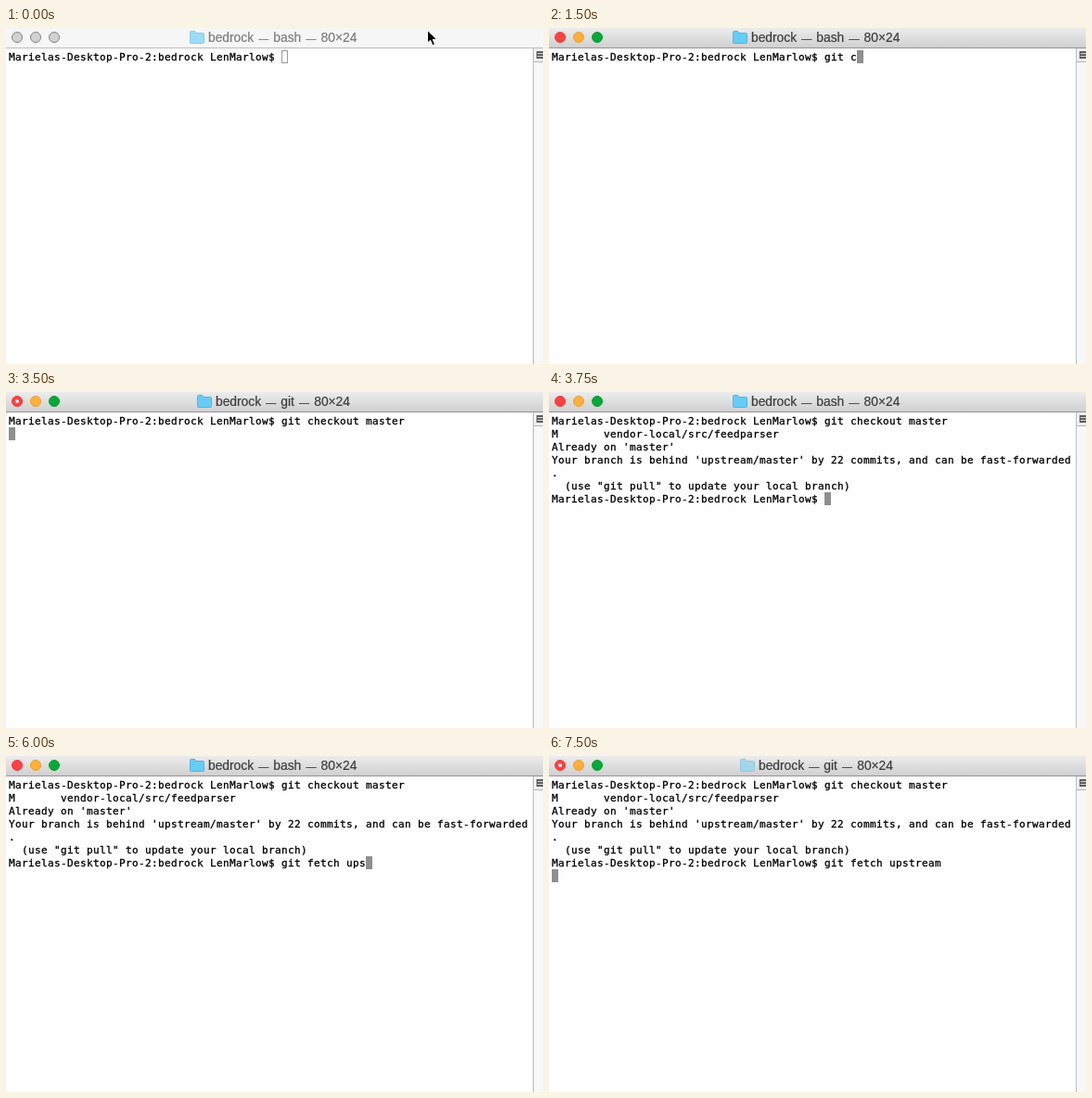
Recreate the animation shown at these times as an HTML page. Size 579 by 362 pixels, loop 8000 ms.

```html
<!DOCTYPE html>
<html lang="en">
<head>
<meta charset="utf-8">
<title>Terminal</title>
<style>
  html, body { margin: 0; width: 579px; height: 362px; overflow: hidden; background: #fefefe; }
  body { position: relative; }
  svg { position: absolute; overflow: visible; }

  #bar {
    position: absolute; left: 0; top: 0; width: 579px; height: 21px;
    background: linear-gradient(#ececec, #d0d0d0);
    border-bottom: 1px solid #949494;
  }
  #title {
    position: absolute; left: 198px; top: 0; padding-left: 20px;
    font: 13.8px/21px "Liberation Sans", Arial, sans-serif;
    word-spacing: 1.3px;
    -webkit-text-stroke: .2px;
    color: #3c3c3c; white-space: pre;
  }
  #title i { font-size: 11px; font-style: normal; }
  #title svg { left: 0; top: 3px; }
  #folder { fill: #68cdf5; stroke: #50b4e0; }
  #lights { left: 0; top: 0; }
  #lights circle { stroke-width: 1; }
  .red { fill: #fc4043; stroke: #ec3a3d; }
  .amber { fill: #fbb03b; stroke: #e9a033; }
  .green { fill: #0aa838; stroke: #089c34; }
  #dot { fill: #ffe9e6; visibility: hidden; }

  .idle #bar { background: #f6f6f6; border-color: #bdbdbd; }
  .idle #title { color: #7c7c7c; }
  .idle #folder { fill: #9addf6; stroke: #84cdea; }
  .idle #lights circle { fill: #d2d2d2; stroke: #858585; }
  .busy #title { left: 206px; }
  .busy #dot { visibility: visible; }
  .pale #folder { fill: #a3d6e9; stroke: #92c8dd; }

  #scroll {
    position: absolute; left: 568px; top: 22px; width: 10px; height: 340px;
    background: #f8f8f8; border-left: 1px solid #bcbcbc;
  }
  #scroll svg { left: 0; top: 0; }

  #screen {
    position: absolute; left: 3px; top: 24px; margin: 0;
    font: 11px/14px "DejaVu Sans Mono", monospace;
    letter-spacing: calc(7px - 1ch);
    -webkit-text-stroke: .3px;
    color: #000; white-space: pre;
  }
  #text { position: relative; top: 1px; }
  #caret {
    display: inline-block; box-sizing: border-box; width: 7px; height: 14px;
    vertical-align: top; background: #8f8f8f;
  }
  .idle #caret { background: none; border: 1px solid #9a9a9a; }
  #mouse { left: 0; top: 0; }
</style>
</head>
<body class="idle">
  <div id="bar">
    <svg id="lights" width="64" height="21">
      <circle class="red" cx="12" cy="10" r="5.5"/>
      <circle class="amber" cx="32" cy="10" r="5.5"/>
      <circle class="green" cx="52" cy="10" r="5.5"/>
      <ellipse id="dot" cx="12" cy="10" rx="2" ry="2"/>
    </svg>
    <div id="title"><svg width="16" height="14"><path id="folder" d="M.5 12.5V1.5Q.5.5 1.5.5H5.5L7 2.5H14.5Q15.5 2.5 15.5 3.5V12.5Q15.5 13.5 14.5 13.5H1.5Q.5 13.5.5 12.5Z"/></svg>bedrock <i>—</i> <span id="job"></span> <i>—</i> 80×24</div>
  </div>
  <div id="scroll">
    <svg width="10" height="15">
      <rect width="10" height="14" fill="#efefef"/>
      <path d="M0 14.5H10" stroke="#b5b5b5"/>
      <rect x="3" y="3" width="7" height="8" fill="#5c5c5c"/>
      <path d="M4 5.5H10M4 8.5H10" stroke="#d8d8d8"/>
    </svg>
  </div>
  <pre id="screen"><span id="text"></span><span id="caret"></span></pre>
  <svg id="mouse" width="12" height="18">
    <path d="M.5.5V14L3.6 11.2L6 16.7L8.4 15.6L6.1 10.3H10.4Z" fill="#000" stroke="#fff" stroke-width=".9"/>
  </svg>

<script>
  const LOOP = 8000, TICK = 250;
  const PROMPT = "Marielas-Desktop-Pro-2:bedrock LenMarlow$ ";
  const CHECKOUT = "git checkout master";
  const FETCH = "git fetch upstream";
  const OUTPUT = [
    "M       vendor-local/src/feedparser",
    "Already on 'master'",
    "Your branch is behind 'upstream/master' by 22 commits, and can be fast-forwarded",
    ".",
    "  (use \"git pull\" to update your local branch)",
    ""
  ].join("\n");

  // [time, characters typed so far]
  const checkoutKeys = [[750, 1], [1000, 3], [1250, 4], [1500, 5], [1750, 7], [2000, 9],
    [2250, 11], [2500, 13], [2750, 15], [3000, 17], [3250, 19]];
  const fetchKeys = [[4500, 2], [4750, 4], [5250, 6], [5500, 8], [5750, 11], [6000, 13],
    [6250, 14], [6500, 16], [6750, 18]];

  const $ = id => document.getElementById(id);
  const typed = (command, keys, t) =>
    command.slice(0, keys.reduce((n, [at, count]) => t >= at ? count : n, 0));

  function screenText(t) {
    let s = PROMPT + typed(CHECKOUT, checkoutKeys, t);
    if (t >= 3500) s += "\n";
    if (t >= 3750) s += OUTPUT + PROMPT + typed(FETCH, fetchKeys, t);
    if (t >= 7000) s += "\n";
    return s;
  }

  function render(t) {
    const busy = (t >= 3500 && t < 3750) || t >= 7000;
    const body = document.body.classList;
    body.toggle("idle", t < 250);
    body.toggle("busy", busy);
    body.toggle("pale", t >= 7500);
    $("job").textContent = busy ? "git" : "bash";
    $("text").textContent = screenText(t);
    const [x, y] = t < 500 ? [454, 2] : [380, 64];
    $("mouse").style.transform = `translate(${x}px, ${y}px)`;
    $("mouse").style.visibility = t < 750 ? "visible" : "hidden";
  }

  const start = performance.now();
  let last = -1;
  function frame() {
    const elapsed = Math.max(0, performance.now() - start) % LOOP;
    const t = Math.floor(elapsed / TICK) * TICK;
    if (t !== last) render(last = t);
    requestAnimationFrame(frame);
  }
  frame();
</script>
</body>
</html>
```
